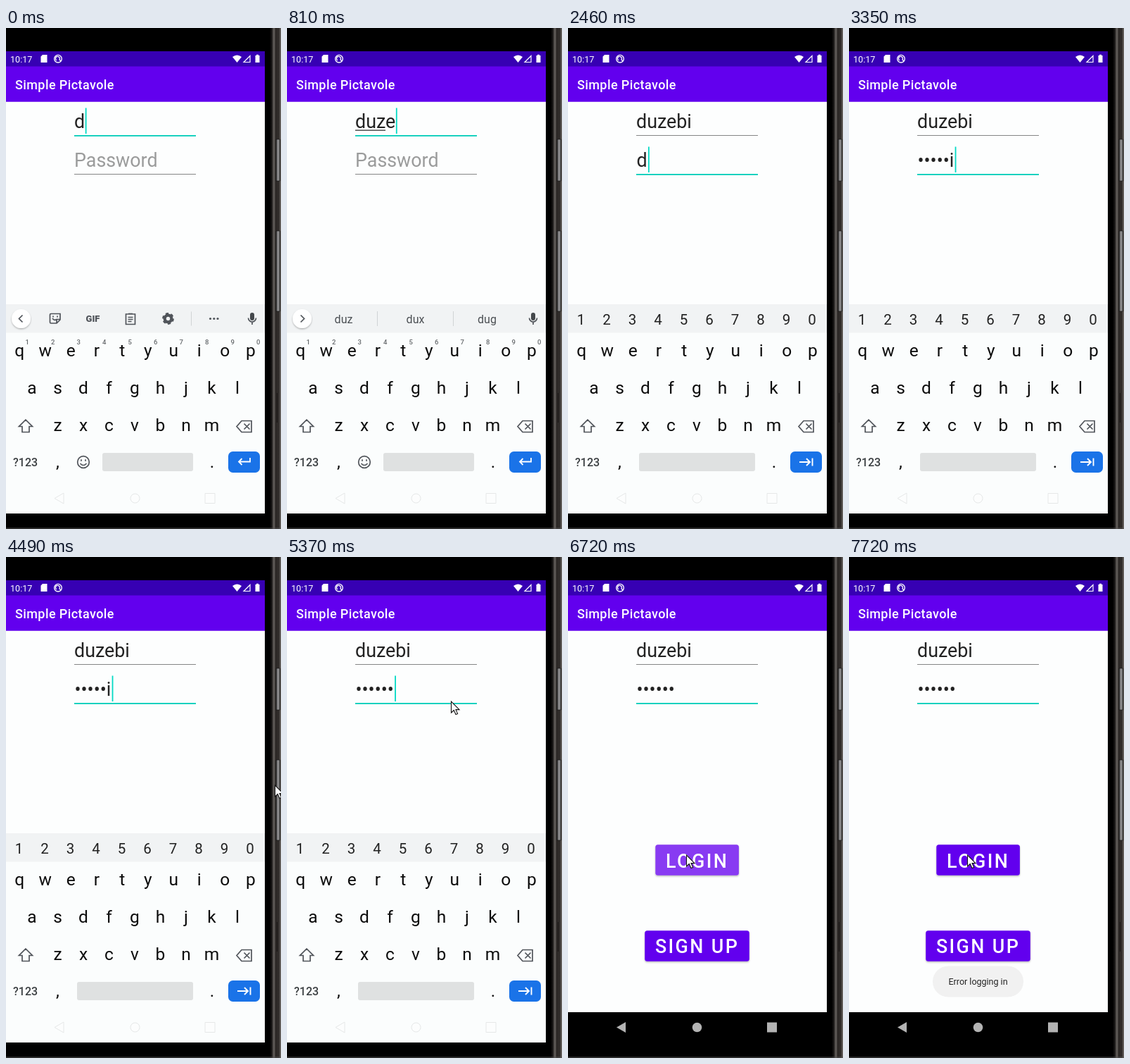
Animation, 391 px wide and 711 px high, one loop 8000 ms. Source, as an HTML page:

```html
<!DOCTYPE html>
<html lang="en">
<head>
<meta charset="utf-8">
<title>Login screen</title>
<style>
html, body { margin: 0; width: 100%; height: 100%; overflow: hidden; background: #000; }
svg { display: block; font-family: Roboto, sans-serif; white-space: pre; }
.mid { text-anchor: middle; }
.bold { font-weight: 500; }
.line { fill: none; stroke: #50545a; stroke-width: 1.7; }
.btn { font: 500 26.85px Roboto, sans-serif; letter-spacing: 2.4px; fill: #fff; }
</style>
</head>
<body>
<svg width="391" height="711" viewBox="0 0 391 711">
  <defs>
    <clipPath id="screen"><path d="M0 33H368V689H0z"/></clipPath>
    <linearGradient id="metal">
      <stop offset="0" stop-color="#000"/><stop offset=".2" stop-color="#1c1a19"/>
      <stop offset=".32" stop-color="#5c5855"/><stop offset=".42" stop-color="#5c5855"/>
      <stop offset=".52" stop-color="#2a2624"/><stop offset=".84" stop-color="#332f2d"/>
      <stop offset=".92" stop-color="#625e5b"/><stop offset="1" stop-color="#625e5b"/>
    </linearGradient>
    <linearGradient id="side">
      <stop offset="0" stop-color="#333"/><stop offset=".5" stop-color="#99989a"/><stop offset="1" stop-color="#555"/>
    </linearGradient>
    <filter id="shade" x="-20%" y="-20%" width="140%" height="160%">
      <feDropShadow dx="0" dy="1.3" stdDeviation=".9" flood-opacity=".3"/>
    </filter>
  </defs>

  <path d="M0 0H391V711H0z"/>
  <path d="M375 0H391V711H375z" fill="url(#metal)"/>
  <path d="M384 158h5.500v59h-5.500zM384 288h5.500v114h-5.500z" fill="url(#side)" stroke="#111" stroke-width=".6"/>
  <path d="M385 518h1v42h-1z" fill="#171413"/>
  <path d="M0 710H391" stroke="#555"/>

  <g clip-path="url(#screen)">
    <path d="M0 104H368V646H0z" fill="#fdfefe"/>
    <path d="M0 33H368V55H0z" fill="#3700b3"/>
    <path d="M0 54.500H368V104.700H0z" fill="#6200ee"/>
    <g fill="#fff">
      <text x="6" y="48.5" font-size="12.6">10:17</text>
      <path d="M52 38h6.500v11h-9v-8.500zM322 41q6.500-5 13 0l-6.500 8zM354.500 39h1.500v-1.300h3V39h1.500v10h-6z"/>
      <path d="M338 48.500h9v-9z" fill="none" stroke="#fff" stroke-width="1.200"/>
      <circle cx="74" cy="43.700" r="5.300" fill="none" stroke="#fff" stroke-width="1.400"/>
      <path d="M72 46a3 3 0 1 1 4-1l2 2" fill="none" stroke="#fff" stroke-width="1.300"/>
      <text class="bold" x="13" y="87" font-size="18" letter-spacing=".4">Simple Pictavole</text>
    </g>

    <g font-size="26.85" fill="#222">
      <text id="user" x="97" y="142"></text>
      <text id="hint" x="97" y="197" fill="#9b9c9c">Password</text>
      <text id="pass" x="97.5" y="197"></text>
    </g>
    <rect id="compose" x="97" y="144.500" height="1.300" fill="#333"/>
    <rect id="userLine" x="97" width="173"/>
    <rect id="passLine" x="97" width="173"/>
    <rect id="caret" width="1.800" height="36.500" fill="#03dac5"/>

    <g filter="url(#shade)" fill="#6200ee">
      <rect id="login" x="124.300" y="408.300" width="118.600" height="43.500" rx="3.500"/>
      <rect x="109.200" y="530.200" width="148.600" height="43.500" rx="3.500"/>
    </g>
    <text class="btn mid" x="183.600" y="441">LOGIN</text>
    <text class="btn mid" x="183.600" y="562">SIGN UP</text>
    <g id="toast">
      <rect x="119" y="580.500" width="129" height="44" rx="22" fill="#f1f1f1"/>
      <text class="mid" x="183.500" y="607.300" font-size="12.500" fill="#222">Error logging in</text>
    </g>
    <path d="M0 646H368V689H0z"/>
    <g id="nav" fill="#b3b3b3"><path d="M69 667.500L82 660V675zM283 660.500h14v14h-14z"/><circle cx="183.500" cy="667.500" r="6.800"/></g>

    <g id="keyboard">
      <path d="M0 392H368V700H0z" fill="#fbfdfd"/>
      <path d="M0 392H368V432.500H0z" fill="#f1f3f4"/>
      <g fill="#fcfdfd" stroke="#e6e8e8"><path d="M69 667.500L82 660V675zM283 660.500h14v14h-14z"/><circle cx="183.500" cy="667.500" r="6.500"/></g>
      <g id="keys" class="mid" font-size="24.500" fill="#0c0c0c"></g>
      <path class="line" d="M28 556l9.500 9.500h-4.500v8h-10v-8h-4.500zM335 557.500h14v16h-14l-7-8zM338.500 561.500l8 8m0-8l-8 8"/>
      <text class="bold" x="10" y="621.500" font-size="16" fill="#3c4043">?123</text>
      <rect x="316" y="601" width="45" height="30" rx="6.500" fill="#1a73e8"/>

      <g id="textKeys">
        <g id="hints" class="mid bold" font-size="9.500" fill="#666a6d"></g>
        <rect x="137" y="603" width="129" height="26" rx="3" fill="#dfe1e1"/>
        <circle class="line" cx="110" cy="616" r="8.300"/>
        <path class="line" d="M105.500 618q4.500 5 9 0M107 612.300v2.500M113 612.300v2.500"/>
        <path d="M347 610v5.500h-16m4.500-4.500l-4.500 4.500l4.500 4.500" fill="none" stroke="#fff" stroke-width="1.800"/>
        <circle cx="21.500" cy="412.500" r="13.500" fill="#fff" filter="url(#shade)"/>
        <path id="chevron" class="line"/>
        <path d="M347 409v-2a3 3 0 0 1 6 0v5a3 3 0 0 1-6 0z" fill="#44484c"/>
        <path class="line" d="M344.500 411.500a5.500 5.500 0 0 0 11 0M350 417v4"/>
        <g id="tools">
          <path class="line" d="M64 405.500h13v8.500l-5 5h-8q-1.500 0-1.500-1.500v-10.500q0-1.500 1.500-1.500zM77.500 413.500h-5.500v5.500M66 412q3 4 6 1.500M67 408.500v2M73 408.500v2"/>
          <text class="mid" x="123.500" y="417" font-size="13" font-weight="900" fill="#50545a">GIF</text>
          <path class="line" d="M170.500 406h13v14.500h-13zM173.500 410.500h7M173.500 413.500h7M173.500 416.500h5M174 405.500h6"/>
          <circle cx="230.500" cy="412.500" r="4.800" fill="none" stroke="#50545a" stroke-width="4.200"/>
          <circle cx="230.500" cy="412.500" r="7.300" fill="none" stroke="#50545a" stroke-width="2.200" stroke-dasharray="4.200 3.440"/>
          <path d="M263.500 402.500v20" stroke="#d0d3d5"/>
          <g fill="#50545a"><circle cx="290.500" cy="412.500" r="1.600"/><circle cx="295.800" cy="412.500" r="1.600"/><circle cx="301" cy="412.500" r="1.600"/></g>
        </g>
        <g id="words" class="mid" font-size="16" fill="#4c5054">
          <text x="80.500" y="418.500"></text><text x="182.500" y="418.500"></text><text x="284.500" y="418.500"></text>
          <path d="M128.500 402v21M236.500 402v21" stroke="#d0d3d5"/>
        </g>
      </g>

      <g id="passKeys">
        <g id="digits" class="mid" font-size="20.500" fill="#222"></g>
        <rect x="101" y="603" width="165" height="26" rx="3" fill="#dfe1e1"/>
        <path d="M329 616h15m-5-5l5 5l-5 5M347.500 610.500v11" fill="none" stroke="#fff" stroke-width="1.900"/>
      </g>
    </g>
  </g>
  <path id="pointer" d="M.5 0V16L4.300 12.500L7 18.500L9.600 17.400L7 11.600H12z" fill="#fff" stroke="#111" stroke-width="1.100"/>
</svg>
<script>
const $ = id => document.getElementById(id);
const set = (el, attrs) => { for (const k in attrs) el.setAttribute(k, attrs[k]); };
const show = (id, on) => $(id).style.display = on ? '' : 'none';

const row = (chars, x, y) => [...chars].map((c, i) =>
  `<text x="${x + i * 36.5}" y="${y}">${c}</text>`).join('');
$('keys').innerHTML = row('qwertyuiop', 19.3, 466) + row('asdfghjkl', 37, 519)
  + row('zxcvbnm', 73.5, 572) + row(',', 73.5, 624) + row('.', 293, 624);
$('hints').innerHTML = row('1234567890', 30.3, 449);
$('digits').innerHTML = row('1234567890', 18.6, 420.5);

// Each track lists [start, value]; a value holds until the next start.
const tracks = {
  user: [[0, 'd'], [140, 'du'], [410, 'duz'], [810, 'duze'], [1340, 'duzen'], [1710, 'duzeb'], [1960, 'duzebi']],
  composed: [[0, 0], [270, 2], [530, 3], [1060, 4], [1460, 5], [1710, 4], [1960, 5], [2080, 6], [2200, 0]],
  words: [[0, ''], [270, 'du due dust'], [530, 'duz dux dug'], [1060, 'duze duzebi dozen'],
    [1460, 'duzen dozen dozens'], [1710, 'duze duzebi dozen'], [1960, 'duzeb duzebi dozen'], [2080, 'duzebi dozen dozens']],
  pass: [[0, ''], [2460, 'd'], [2710, '•u'], [2830, '••z'], [3110, '•••e'], [3230, '••••b'], [3350, '•••••i'], [4760, '••••••']],
  caret: [[0, 1], [3870, 0], [4370, 1], [5010, 0], [5370, 1], [5890, 0], [6290, 1], [6720, 0], [7240, 1], [7720, 0]],
  pointer: [[0, 0], [4250, [386, 342]], [4490, [382, 324]], [4610, [379, 307]], [4760, [233, 205]], [5620, 0],
    [6170, [183, 522]], [6290, [168, 487]], [6440, [168, 423]]],
  login: [[0, '#6200ee'], [6720, '#883bf2'], [6840, '#7520f0'], [6960, '#6200ee']],
  toast: [[0, 0], [7360, .35], [7480, .7], [7600, 1]]
};

function draw(t) {
  const now = {};
  for (const k in tracks) now[k] = tracks[k].findLast(step => step[0] <= t)[1];
  const inPass = t >= 2200;

  $('user').textContent = now.user;
  $('pass').textContent = now.pass;
  show('hint', !now.pass);
  set($('compose'), { width: now.composed ? $('user').getSubStringLength(0, now.composed) : 0 });
  for (const [id, active, y] of [['userLine', !inPass, 152], ['passLine', inPass, 207]])
    set($(id), { y, height: active ? 1.8 : 1, fill: active ? '#03cdb9' : '#858686' });
  const field = $(inPass ? 'pass' : 'user');
  const length = field.textContent ? field.getComputedTextLength() : 0;
  set($('caret'), { x: 97.6 + length + (inPass ? 1.2 : 0), y: inPass ? 168.5 : 113.5 });
  show('caret', now.caret);

  const leaving = t >= 5620;
  show('keyboard', t < 5770);
  set($('keyboard'), { opacity: leaving ? .08 : 1, transform: `translate(0 ${leaving ? 47.5 : 0})` });
  set($('nav'), { fill: t < 5770 ? '#c8c8c8' : '#b3b3b3' });
  show('textKeys', !inPass);
  show('passKeys', inPass);
  show('tools', !now.words);
  show('words', now.words);
  now.words.split(' ').forEach((w, i) => $('words').children[i].textContent = w);
  set($('chevron'), { d: now.words ? 'M19.500 407.500l5 5l-5 5' : 'M23.500 407.500l-5 5l5 5' });

  set($('login'), { fill: now.login });
  set($('toast'), { opacity: now.toast });
  show('pointer', now.pointer);
  if (now.pointer) set($('pointer'), { transform: `translate(${now.pointer})` });
}

const start = performance.now();
function frame() {
  draw((performance.now() - start) % 8000);
  requestAnimationFrame(frame);
}
frame();
</script>
</body>
</html>
```
